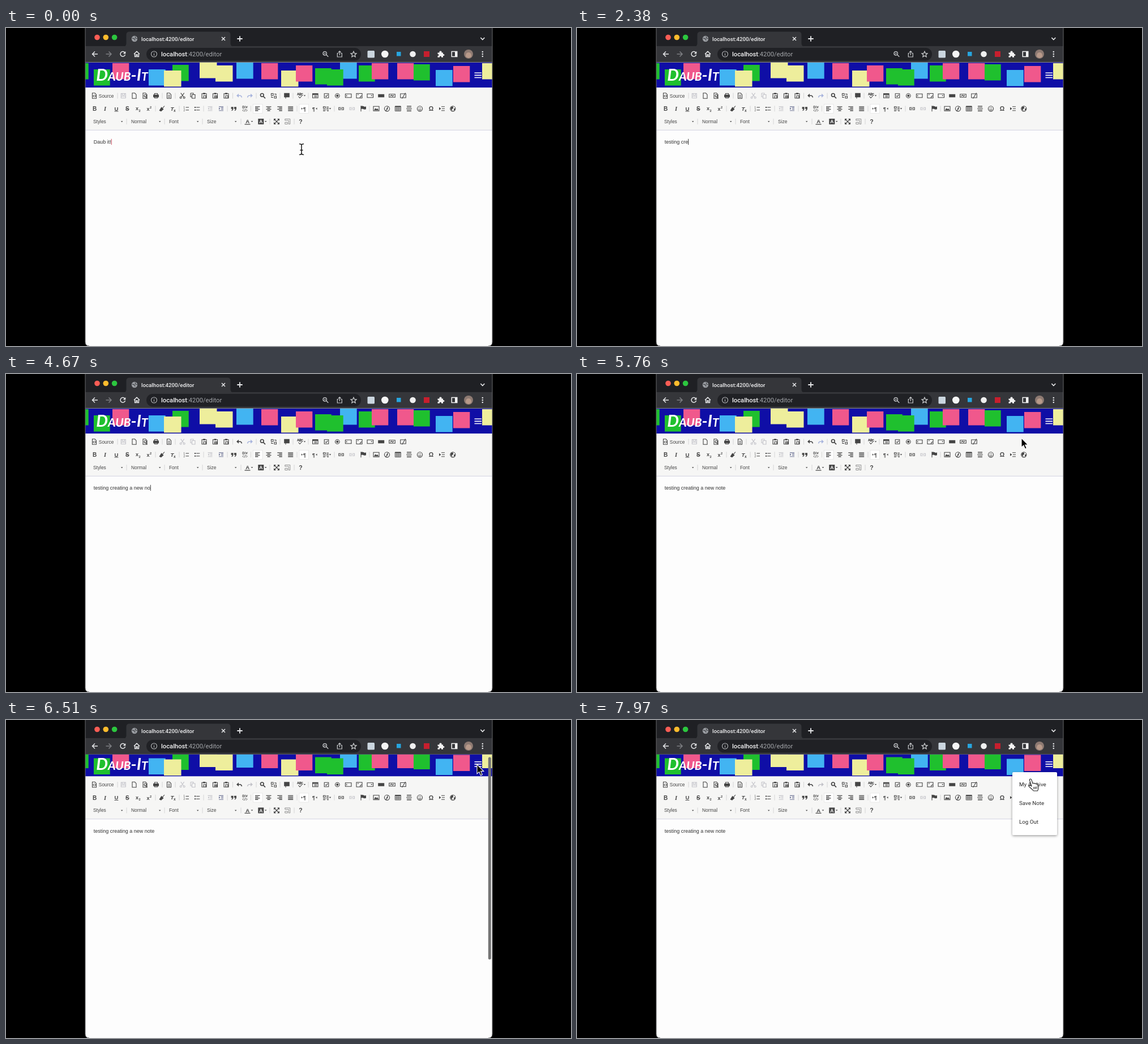
Write an HTML page that moves like this. It is 998 px wide and 561 px high and loops after 8000 ms.

```html
<!DOCTYPE html>
<html lang="en">
<head>
<meta charset="utf-8">
<title>Note editor</title>
<style>
html, body { margin: 0; width: 100%; height: 100%; overflow: hidden; background: #000; }
svg { display: block; width: 100%; height: 100%; }
text { white-space: pre; }
.ui { font-family: Roboto, sans-serif; }
.ed { font-family: "Liberation Sans", Arial, sans-serif; }
.serif { font-family: "Liberation Serif", serif; }
</style>
</head>
<body>
<svg id="stage" viewBox="0 0 998 561">
  <defs>
    <clipPath id="win"><path d="M140 0H859V554Q859 561 852 561H147Q140 561 140 554Z"/></clipPath>
    <clipPath id="view"><path d="M140 60.5H859V561H140Z"/></clipPath>
    <clipPath id="band"><path d="M140 61H859V105H140Z"/></clipPath>
    <filter id="soft" x="-20%" y="-20%" width="140%" height="140%">
      <feDropShadow dx="0" dy="1.5" stdDeviation="2" flood-opacity=".4"/>
    </filter>
  </defs>
  <rect width="998" height="561"/>
  <g clip-path="url(#win)">
    <rect x="140" width="719" height="561" fill="#fdfdfd"/>
    <g clip-path="url(#view)">
      <g id="page">
        <rect x="140" y="105" width="719" height="75" fill="#f6f6f5"/>
        <path d="M140 180.2H859" stroke="#d3d3e2"/>
        <g id="band-notes" clip-path="url(#band)"><rect x="140" y="61" width="719" height="44" fill="#0f0ea6"/></g>
        <circle id="ripple" cx="833.5" cy="83.5" r="13" fill="#4a4ae0" opacity="0"/>
        <text x="159.3" y="93" font-family="Lato, sans-serif" font-size="29.3" font-weight="700" font-style="italic" font-variant="small-caps" fill="#fff">Daub-It</text>
        <path d="M827.5 79.3h12.5M827.5 83.4h12.5M827.5 87.5h12.5" stroke="#fff" stroke-width="1.6"/>
        <g id="tools"></g>
        <text id="note" class="ed" x="154.7" y="204" font-size="9" fill="#333"></text>
        <path id="caret" stroke-width=".9"/>
      </g>
    </g>
    <rect id="bar" x="851.8" y="65.5" width="5" height="357" rx="2.5" fill="#757575"/>
    <g id="chrome"></g>
    <g id="menu" class="ui" font-size="9.75" fill="#2b2b2b">
      <rect x="769" y="92" width="79" height="111" rx="2.2" fill="#fff" filter="url(#soft)"/>
      <text x="781" y="116.5">My Archive</text>
      <text x="781" y="149.5">Save Note</text>
      <text x="781" y="183">Log Out</text>
    </g>
  </g>
  <path d="M140 0V554Q140 561 147 561M852 561Q859 561 859 554V0" fill="none" stroke="#6a6a6c" stroke-width="1"/>
  <g id="beam" fill="none" stroke-linecap="round">
    <path d="M-3.5 -9.5Q0 -9.5 0 -7V7Q0 9.5 -3.5 9.5M3.5 -9.5Q0 -9.5 0 -7V7Q0 9.5 3.5 9.5M-2 1.5H2" stroke="#fff" stroke-width="3"/>
    <path d="M-3.5 -9.5Q0 -9.5 0 -7V7Q0 9.5 -3.5 9.5M3.5 -9.5Q0 -9.5 0 -7V7Q0 9.5 3.5 9.5M-2 1.5H2" stroke="#222" stroke-width="1.6"/>
  </g>
  <path id="arrow" d="M0 0V16.5L3.8 13L6.5 19.3L9.3 18.1L6.6 12H11.8Z" fill="#000" stroke="#fff" stroke-width="1.1"/>
  <path id="hand" d="M-1.6 1Q-2 -1 0 -1Q1.4 -1 2 1L4 7Q5.5 5.5 7 7.2Q8.6 6.2 10 8Q12 7.3 12.8 9.5L14 14Q14.2 17 12.5 20H5.5Q3 17 -1.5 13.5Q-3.5 11.5 -2 10.6Q0 10 2 12Z M6 13v4M8.5 12.7v4M11 12.4v4" fill="#fff" stroke="#222" stroke-width="1.1" stroke-linejoin="round"/>
</svg>
<script>
const $ = id => document.getElementById(id);
const LOOP = 8000, INK = '#454545', FADED = '#c3c3c9', PALE = '#a9b5dd';

function add(parent, tag, attrs, label) {
  const el = document.createElementNS('http://www.w3.org/2000/svg', tag);
  for (const k in attrs) el.setAttribute(k, attrs[k]);
  if (label) el.textContent = label;
  parent.appendChild(el);
  return el;
}

// An icon is "stroked path|filled path" around its centre.
function icon(parent, x, y, shape, color = INK, weight = 1.1) {
  const g = add(parent, 'g', { transform: `translate(${x} ${y})`, color });
  const [line, solid] = shape.split('|');
  if (solid) add(g, 'path', { d: solid, fill: 'currentColor' });
  if (line) add(g, 'path', { d: line, fill: 'none', stroke: 'currentColor', 'stroke-width': weight });
  return g;
}
function label(parent, x, y, s, size, fill = INK, more = {}) {
  return add(parent, 'text', { class: 'ed', x, y, 'font-size': size, fill, ...more }, s);
}
const disc = r => `M${-r} 0a${r} ${r} 0 1 0 ${2 * r} 0a${r} ${r} 0 1 0 ${-2 * r} 0Z`;
const box = (w, h) => `M${-w / 2} ${-h / 2}h${w}v${h}h${-w}Z`;
const lines = (...xs) => xs.map(([a, b], i) => `M${a} ${i * 2.3 - 3.45}H${b}`).join('');

function drawBand() {
  const kinds = { g: ['#1fc02e', 28.7], p: ['#f0588c', 29.3], b: ['#42b4f2', 29.7], y: ['#eeee9c', 30.5] };
  const notes = '117g62 155g73 188p62 252b73 294g65 279y75 342y60 370y66 407b61 451p62 486y75 512p66 546g71 590b61 567g73 623g66 646p62 691p62 720g64 759b74 790p67 841y62';
  for (const n of notes.split(' ')) {
    const [, x, kind, y] = n.match(/(\d+)(\w)(\d+)/), [fill, width] = kinds[kind];
    add($('band-notes'), 'rect', { x, y, width, height: 28.5, fill });
  }
}

function drawTools() {
  const t = $('tools'), page = 'M-3 -4.7H1L3.5 -2V4.7H-3.5V-4.7Z', clip = 'M-2 -3.7H-4V4.2H4V-3.7H2M-1 0H3V4H-1Z|M-2 -5h4v2.4h-4z';
  const arc = 'M-2 -.5H2Q4 0 4.5 2.7|M-5 -.5L-1 -4V3Z', back = 'M2 -.5H-2Q-4 0 -4.5 2.7|M5 -.5L1 -4V3Z';
  const tick = '|M-1.8 -1H1.8L0 1.1Z', chain = 'M-.5 -2H-4.2V2H-.5M.5 -2H4.2V2H.5M-2.5 0H2.5';
  const row = (y, list) => list.map(([x, s, c, w]) => icon(t, x, y, s, c, w));
  const bars = (y, xs) => xs.forEach(x => add(t, 'path', { d: `M${x} ${y - 5}v10`, stroke: '#cfcfcf', 'stroke-width': .8 }));
  bars(119.5, [197, 276, 299, 400.5, 442, 484, 507, 534]);
  bars(142.3, [264, 306, 349, 391, 432.5, 514, 580, 642]);
  bars(165, [213, 280, 347, 415, 466, 509]);
  for (const x of [436.5, 518]) add(t, 'rect', { x, y: 134.5, width: 16.5, height: 16, fill: '#fff', stroke: '#dedede', 'stroke-width': .6 });

  row(119.5, [
    [156, page + 'M-.5 -1.5L-2 .5L-.5 2.5M.8 -1.5L2.3 .5L.8 2.5'], [207.3, box(8, 8) + 'M-2 -4V-1H2V-4M-4 1H4', FADED],
    [226.5, page], [245.5, page + 'M1 2L4 5M-1.5 0a2 2 0 1 0 4 0a2 2 0 1 0 -4 0'],
    [265, 'M-2.6 -1.5V-4H2.6V-1.5M-2.6 2V4H2.6V2|M-5 -2H5V2.8H-5Z'], [288, page + 'M-1.5 -1H1.5M-1.5 1H1.5M-1.5 3H1.5'],
    [350, clip], [369.5, clip + 'M0 1h2v2h-2z'], [389, clip + 'M-1 2H3'],
    [453.5, 'M1 1L4.5 4.7M-4 -1.2a2.8 2.8 0 1 0 5.6 0a2.8 2.8 0 1 0 -5.6 0', INK, 1.7],
    [473, 'M-4.5 -4H-1V-.5H-4.5ZM1 .8H4.5V4.3H1ZM1 -3H4V-1M-1 3H-4V1'],
    [496, 'M-2 2V5|M-4.8 -4.7H4.8V2.8H-4.8Z'],
    [520.5, 'M-4 1L-1.5 4L4 -2M-6 -1L-4.5 -4.5L-3 -1M-2 -4.5V-1H0V-4.5ZM4 -4H1.5V-1'],
    [527.5, tick],
    [546.3, box(9.5, 7.5) + 'M-2 0H3M-2 2H3|M-4.7 -3.7h9.4v2.3h-9.4z'], [566, box(7.5, 7.5) + 'M-2 0L-.5 1.7L2.2 -1.8'],
    [585.3, disc(3.8) + '|' + disc(2.1)], [604.7, box(10.5, 6.5) + 'M-3 -1.5V1.5'],
    [624, box(10, 8) + 'M-3 -2H-1M4 0L1 3'], [643.3, box(10.5, 6.5) + '|M1 -1H4L2.5 1Z'],
    [662.7, '|M-5.5 -2.8H5.5V2.8H-5.5Z'], [682, box(10.5, 5.5) + 'M-3.5 1L-1 -1L1 1L3 -1'], [701.5, box(9.5, 7) + 'M4 -5L-2 5']
  ]);
  label(t, 163.8, 122.7, 'Source', 8.4);

  label(t, 153, 146, 'B', 10, INK, { 'font-weight': 700 });
  label(t, 173, 146, 'I', 10.5, INK, { 'font-weight': 700, 'font-style': 'italic', class: 'serif' });
  label(t, 191.5, 145.5, 'U', 9.5, INK, { 'font-weight': 700, 'text-decoration': 'underline' });
  label(t, 211, 146, 'S', 10, INK, { 'font-weight': 700, 'text-decoration': 'line-through' });
  label(t, 229, 145, 'x', 9, INK, { 'font-weight': 700 });
  label(t, 234.5, 147.5, '2', 5.5, INK, { 'font-weight': 700 });
  label(t, 248.5, 146, 'x', 9, INK, { 'font-weight': 700 });
  label(t, 254, 142, '2', 5.5, INK, { 'font-weight': 700 });
  label(t, 290.5, 145.5, 'T', 9.5, INK, { 'font-weight': 700, 'font-style': 'italic' });
  label(t, 296, 147.5, 'x', 6.5, INK, { 'font-weight': 700 });
  label(t, 746.8, 146, 'Ω', 10.5, INK, { 'font-weight': 700 });
  label(t, 525, 145.5, '¶', 8.5, INK, { 'font-weight': 700 });
  label(t, 541, 145.5, '¶', 8.5, INK, { 'font-weight': 700 });
  label(t, 313.5, 141.5, '1', 4.5);
  label(t, 313.5, 146.8, '2', 4.5);
  row(142.3, [
    [275.5, 'M1 -1L4.5 -4.8|M-1 -3L3 1L-1.5 5L-5 3.5Z'], [318.5, 'M-1 -2.3H4.5M-1 2.4H4.5'],
    [337.5, 'M-1.5 -2.3H4.8M-1.5 2.4H4.8|M-4.5 -3.4h2.1v2.1h-2.1zM-4.5 1.4h2.1v2.1h-2.1z'],
    [360.5, lines([-4, 4], [0, 4], [0, 4], [-4, 4]) + '|M-4 0L-1.5 -2V2Z', FADED],
    [380, lines([-4, 4], [0, 4], [0, 4], [-4, 4]) + '|M-1.5 0L-4 -2V2Z', '#6f7597'],
    [402.3, '|M-4.7 -3H-.7V.3Q-1 3 -3.5 4L-4 3Q-2.7 2 -2.7 .5H-4.7ZM.7 -3H4.7V.3Q4.4 3 1.9 4L1.4 3Q2.7 2 2.7 .5H.7Z'],
    [422, 'M-4 -4.5V-1H-2Q-1 -2.8 -2 -4.5ZM.2 -5V-.5M2 -4.5L3 -1L4.4 -4.5M-2 1L-4 3L-2 5M.8 .8L-.6 5M2 1L4 3L2 5', INK, .9],
    [444.5, lines([-4.5, 4], [-4.5, 1], [-4.5, 4], [-4.5, 1]), INK, 1.3],
    [464, lines([-4.5, 4.5], [-2.5, 2.5], [-4.5, 4.5], [-2.5, 2.5]), INK, 1.3],
    [483.3, lines([-4, 4.5], [-1, 4.5], [-4, 4.5], [-1, 4.5]), INK, 1.3],
    [502.7, lines([-4.5, 4.5], [-4.5, 4.5], [-4.5, 4.5], [-4.5, 4.5]), INK, 1.3],
    [522.8, '|M-1 -1.8L1.4 0L-1 1.8Z'], [548.5, '|M1 -1.8L-1.4 0L1 1.8Z'],
    [565, 'M-4.5 -3.5h3.6v3h-3.6zM1 -3H5M1 -.7H5M-5 2H0M-5 4H-1M1 2H5M2 4H5'], [572.5, tick],
    [592, chain], [611.3, chain, FADED], [631, 'M-4 -5V5|M-4 -4.5Q-1 -5.5 1 -4T5 -4V1Q2 2 0 .8T-4 1Z'],
    [654, box(10, 8) + '|M-4 3L-1.5 -1L.5 1L2 -.5L4.3 3Z'], [673, 'M2.5 -3Q.5 -3 0 0T-2.5 3M-1 .3H2' + disc(4.6)],
    [692.3, box(10, 8.5) + 'M-5 -.5H5M-5 2H5M-1.7 -3V4M1.7 -3V4|M-5 -4.5H5V-2.5H-5Z', INK, .9],
    [712, 'M-4 -4.5H4M-4 -2.5H4M-5 0H5M-4 2.5H4M-4 4.5H4'], [731, disc(4.6) + 'M-2.4 1Q0 4 2.4 1|M-2 -2h1.2v1.5h-1.2zM.8 -2H2V-.5H.8Z'],
    [770, 'M-1 -3.5H5M0 0H5M-1 3.5H5|M-5 -2.5L-1.5 0L-5 2.5Z'], [789.3, disc(4.6) + '|M-3.5 -3L0 -4L1 -1L-1.5 1L-1 4L-4 1ZM2 0L4 -1L3.5 3L1.5 3Z']
  ]);

  [['Styles', 154], ['Normal', 221], ['Font', 288], ['Size', 355]].forEach(([s, x]) => {
    label(t, x, 167.6, s, 8.4);
    icon(t, x + 50.7, 165.2, tick);
  });
  label(t, 423.3, 168, 'A', 9.5, INK, { 'font-weight': 700 });
  row(165, [
    [427, 'M-5.5 4.8H4.5', INK, 1.3], [434.5, tick], [450.3, '|M-5 -5H5V5H-5Z'], [458.7, tick],
    [478, 'M-4 -4L4 4M4 -4L-4 4|M-5 -5h4l-4 4zM5 -5v4l-4 -4zM-5 5v-4l4 4zM5 5h-4l4 -4z'],
    [497.3, 'M-4.5 4.5V1.5H0V4.5ZM-4.5 -4.5H4.5V4.5H2V-2H-4.5Z', '#888', .9]
  ]);
  label(t, 447.3, 168, 'A', 8.5, '#fff', { 'font-weight': 700 });
  label(t, 517.2, 168.6, '?', 10.5, INK, { 'font-weight': 700 });

  return {
    edit: row(119.5, [
      [311.7, 'M-3 -4.8L2 2M3 -4.8L-2 2M-4.5 3.2a1.5 1.5 0 1 0 3 0a1.5 1.5 0 1 0 -3 0M1.5 3.2a1.5 1.5 0 1 0 3 0a1.5 1.5 0 1 0 -3 0'],
      [330, 'M-4 -4.5H1V-2M-4 -4.5V2H-2M-1.5 -2H4V4.5H-1.5Z']]),
    undo: icon(t, 412, 119.8, arc, PALE, 1.6),
    redo: icon(t, 431, 119.8, back, PALE, 1.6)
  };
}

function drawChrome() {
  const c = $('chrome'), W = '#e6e7e9';
  const rect = (x, y, width, height, fill, rx = 0) => add(c, 'rect', { x, y, width, height, fill, rx });
  rect(140, 0, 719, 33, '#1f2024');
  rect(140, 32, 719, 28.6, '#35363a');
  add(c, 'path', { d: 'M208 33Q212.5 32 212.5 27V12Q212.5 6.5 218 6.5H391Q396.5 6.5 396.5 12V27Q396.5 32 401 33Z', fill: '#35363a' });
  rect(248, 35, 379, 22.5, '#202125', 11.2);
  ['#fb5d55', '#fcbb2d', '#2cc63f'].forEach((f, i) => add(c, 'circle', { cx: 161 + i * 15.3, cy: 16.5, r: 4.8, fill: f }));
  label(c, 239, 22.5, 'localhost:4200/editor', 9.7, '#f1f1f2', { class: 'ui', 'font-weight': 500 });
  const url = label(c, 274, 50, '', 11.2, '#a4a7ab', { class: 'ui' });
  add(url, 'tspan', { fill: '#f4f4f5', 'font-weight': 500 }, 'localhost');
  add(url, 'tspan', {}, ':4200/editor');
  const put = (x, y, s, color = W, w = 1.5) => icon(c, x, y, s, color, w);
  put(227, 19, '|' + disc(5.2), '#9b9ea3');
  put(227, 19, 'M-4 -1L0 0L1 3M1 -4L2 -1L5 0', '#45474b', 1.3);
  put(384, 19, 'M-3 -3L3 3M3 -3L-3 3');
  put(413, 19, 'M-4.7 0H4.7M0 -4.7V4.7', W, 1.8);
  put(841.8, 18.5, 'M-3.5 -1.5L0 2L3.5 -1.5', W, 1.7);
  put(157, 46, 'M5 0H-4M0 -4.5L-4.5 0L0 4.5');
  put(181.5, 46, 'M-5 0H4M0 -4.5L4.5 0L0 4.5', '#7d7f83');
  put(206.3, 46, 'M3.6 -2.5A4.3 4.3 0 1 0 4.2 1|M5 -5V-.5H.5Z');
  put(231, 46, 'M-5 0L0 -4.7L5 0M-3.4 -1V4.5H-1V1H1V4.5H3.4V-1');
  put(261.5, 46, disc(5) + 'M0 -.8V2.8M0 -2.8V-1.7', '#b8babd', 1.1);
  put(564.5, 46, 'M1.2 1.2L4.8 4.8M-4.5 -1.2a3.2 3.2 0 1 0 6.4 0a3.2 3.2 0 1 0 -6.4 0M-2.7 -1.2H.2', '#c8cacd', 1.3);
  put(589.3, 46, 'M-2 -1.5H-4V5H4V-1.5H2M0 2V-5M-2.3 -3L0 -5.2L2.3 -3', '#c8cacd', 1.2);
  put(614, 46.3, 'M0 -5L1.5 -1.6L5 -1.3L2.3 1L3.1 4.6L0 2.7L-3.1 4.6L-2.3 1L-5 -1.3L-1.5 -1.6Z', '#d0d2d4', 1.2);
  rect(638.5, 40, 12.5, 12.5, '#cbd6df', 1.5);
  put(669.3, 46, '|' + disc(6.3), '#f5f5f5');
  rect(690, 42, 7.5, 7.5, '#27a5de');
  put(718.5, 46, '|' + disc(5.3), '#f0f0f0');
  rect(738, 41, 10, 10, '#c71f2e');
  put(767.5, 46.5, '|M-5 -3H-2Q-2.5 -6 0 -6T2 -3H4.5V-.5Q7 -.7 7 1T4.5 2.6V5.3H1.6Q1.7 3 0 3T-1.7 5.3H-5V2.5Q-2.8 2.5 -2.8 1T-5 -.5Z', '#f3f3f3');
  put(792, 46, box(9.5, 8.8) + '|M1 -4.5H5V4.5H1Z', '#f3f3f3');
  put(817, 46, '|' + disc(8), '#8d7a72');
  put(817, 47, '|M-5 3Q-5 -4 0 -4T5 3Q3 6 0 6T-5 3Z', '#b89a8a');
  for (const dy of [-4, 0, 4]) put(841.8, 46 + dy, '|' + disc(1.3));
}

drawBand();
drawChrome();
const tool = drawTools();

const FIRST = 'Daub it!', TYPED = 'testing creating a new note';
const TYPE_AT = 735, KEY = 163, WIPE_AT = 120, MENU_AT = 7045;
const path = [[5250, 522, 214], [5760, 785, 113], [6090, 807, 96], [6550, 832.5, 78], [7250, 832.5, 78], [7800, 801, 105], [8000, 801, 105]];
const span = (t, a, b) => Math.min(1, Math.max(0, (t - a) / (b - a)));

function pointer(t) {
  if (t <= path[0][0]) return path[0].slice(1);
  const i = path.findIndex(p => p[0] >= t), a = path[i - 1], b = path[i];
  const u = span(t, a[0], b[0]), k = u * u * (3 - 2 * u);
  return [a[1] + (b[1] - a[1]) * k, a[2] + (b[2] - a[2]) * k];
}
function written(t) {
  if (t >= TYPE_AT) return TYPED.slice(0, 1 + Math.floor((t - TYPE_AT) / KEY));
  return FIRST.slice(0, Math.max(0, FIRST.length - Math.max(0, Math.ceil((t - WIPE_AT) / 55))));
}
const show = (id, on) => $(id).setAttribute('opacity', +on);
const move = (id, x, y) => $(id).setAttribute('transform', `translate(${x} ${y})`);

function draw(t) {
  const scroll = 5.5 * span(t, 6000, 6125);
  move('page', 0, -scroll);
  show('bar', span(t, 5980, 6010) * (1 - span(t, 6700, 6900)));

  $('note').textContent = written(t);
  const cx = 155.2 + $('note').getComputedTextLength();
  $('caret').setAttribute('d', `M${cx} 195.7V206`);
  $('caret').setAttribute('stroke', t < WIPE_AT ? '#c43a4c' : '#222');
  show('caret', t < 5500 || (t >= 6000 && t < 6500));

  const touched = t > WIPE_AT;
  tool.edit.forEach(g => g.setAttribute('color', touched ? FADED : INK));
  tool.undo.setAttribute('color', touched ? INK : PALE);
  tool.redo.setAttribute('color', scroll > 0 ? FADED : PALE);

  const u = span(t, MENU_AT, MENU_AT + 120), s = 1 - .2 * (1 - u) ** 4;
  $('menu').setAttribute('transform', `translate(848 92) scale(${s}) translate(-848 -92)`);
  show('menu', span(t, MENU_AT, MENU_AT + 50));
  show('ripple', .4 * span(t, 6980, 7060) * (1 - span(t, 7250, 7500)));

  const [x, y] = pointer(t), seen = t < TYPE_AT || t > path[0][0];
  const inMenu = t > 7250 && y > 92, inText = !inMenu && y > 180 - scroll;
  for (const [id, on] of [['beam', inText], ['hand', inMenu], ['arrow', !inText && !inMenu]]) {
    move(id, x, y);
    show(id, seen && on);
  }
}

const start = performance.now();
function tick() {
  draw((performance.now() - start) % LOOP);
  requestAnimationFrame(tick);
}
tick();
</script>
</body>
</html>
```
